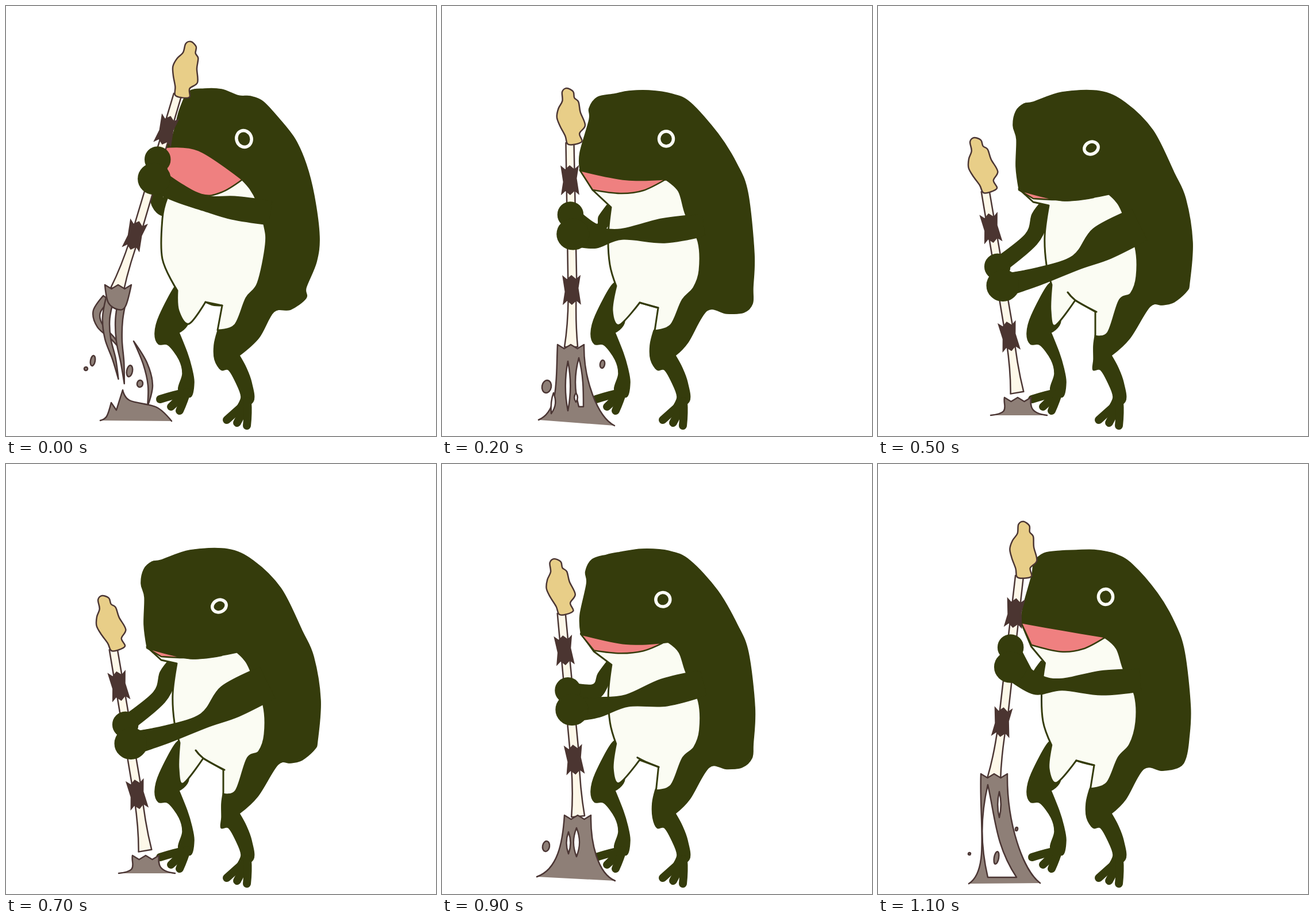
An HTML page that plays this animation: 748 px wide and 748 px high, repeating every 1.2 s.

```html
<!DOCTYPE html>
<html lang="en">
<head>
<meta charset="utf-8">
<title>Frog stirring mud</title>
<style>
html, body { margin: 0; width: 100%; height: 100%; overflow: hidden; background: #fff; }
svg { display: block; width: 100vw; height: 100vh; }
.pose { visibility: hidden; }
.pose.on { visibility: visible; }
path, ellipse { stroke-linejoin: round; stroke-linecap: round; }
.skin { fill: #353c0c; stroke: #353c0c; stroke-width: 1.5; }
.toe { fill: none; stroke: #353c0c; stroke-width: 14; }
.belly { fill: #fbfcf3; stroke: #353c0c; stroke-width: 3; }
.fold { fill: none; stroke: #353c0c; stroke-width: 3; }
.mouth { fill: #ef8080; stroke: #353c0c; stroke-width: 2.6; }
.eye { fill: #353c0c; stroke: #fbfcf6; stroke-width: 5.5; }
.stem { fill: #fdf8e9; }
.tip { fill: #e8ce88; }
.mud { fill: #8e7f77; }
.hole { fill: #fff; }
.stem, .tip, .mud, .hole { stroke: #4b3634; stroke-width: 2.5; }
.clump { fill: #4b3531; }
</style>
</head>
<body>
<svg id="stage" viewBox="0 0 748 748"></svg>
<script>
// Outlines are "x,y" points joined by smooth curves; "!" marks a sharp corner.
// Arms are "x,y,radius" joints. The three key poses match point by point.
const shin = ' 406,608! 418,630 427,655 430,688 401,702 409,680 400,655 387,633 374,633';
const farLeg = '296,485 267,538 259,569 265,588 282,590 301,615 307,640 300,668 321,680 327,655 323,630 315,603 301,568! 318,548 310,490';

const raised = {
  body: '363,615 362,590 368,565! 380,500 310,340! 276,247! 290,225 302,180 318,149 345,144 375,145 405,156 425,157 447,166 475,196 503,232 522,275 536,330 545,400 540,445 522,490 522,508 495,528 466,532 440,577' + shin,
  belly: '411,302! 425,318 436,338 449,380 452,415 438,482 418,508 398,555 368,564! 376,521! 347,515! 318,553 300,530 298,495! 272,440 272,370 280,335! 280,310! 276,247! 340,270',
  fold: '347,515 360,520 376,521',
  mouth: '276,246! 335,251 411,302! 375,324 340,328 281,299!',
  eye: '414,231,13,14.5,-20',
  arm: '460,360,21 395,351,20 345,343,13 300,325,16',
  farArm: '282,335,8 272,355,10 262,340,10'
};
const upright = {
  body: '363,615 362,590 368,565! 380,500 310,340! 240,285! 240,255 256,198 256,178 270,159 300,153 325,148 360,147 400,153 432,168 480,222 513,275 532,325 543,430 541,490 540,518 525,533 495,535 461,530 428,585' + shin,
  belly: '390,302! 412,322 424,362 446,410 448,460 438,490 418,512 398,555 370,565! 376,525! 344,516! 308,555 296,530 303,487! 292,450 289,400 294,350! 262,320! 240,285! 320,303',
  fold: '344,516 358,520 376,525',
  mouth: '240,286! 320,302 390,301! 350,321 310,326 262,320!',
  eye: '390,231,12.5,13,0',
  arm: '455,381,19 385,391,21 312,397,9 268,403,18',
  farArm: '294,350,8 282,372,11 266,392,13'
};
const bowed = {
  body: '375,615 375,590 378,570! 385,500 310,340! 245,318! 240,280 241,232 235,208 240,183 254,170 270,167 320,150 385,148 430,168 478,216 515,290 535,335 547,410 542,480 537,496 515,515 495,520 473,523 438,578' + shin,
  belly: '402,327! 415,340 425,358 448,420 450,470 440,500 420,512 400,568 378,574! 378,532! 343,512! 308,556 300,530 302,485! 293,450 290,400 297,347! 270,341! 245,318! 320,338',
  fold: '330,498 345,513 380,532',
  mouth: '245,320! 320,338 375,333! 350,335 310,337 270,335!',
  eye: '371,247,12.5,10.5,-25',
  arm: '455,380,30 390,413,30 345,446,13 280,470,15',
  farArm: '296,342,10 282,368,15 266,406,13'
};

// Moves every point of pose a towards (or past) pose b.
function blend(a, b, t) {
  const pose = {};
  for (const key in a) {
    const goal = b[key].match(/-?[\d.]+/g);
    let i = 0;
    pose[key] = a[key].replace(/-?[\d.]+/g, n => +(+n + (goal[i++] - n) * t).toFixed(1));
  }
  return pose;
}

// tip and foot: ends of the staff; grip: how far down it the hands hold.
// mud: left and right ends of the heap; holes: x, y, height, bulge, flare; drops: x, y, rx, ry.
const steps = [
  { frog: raised, tip: [322, 62], foot: [195, 486], grip: 213, flying: true,
    drops: [[151, 617, 4, 9], [139, 631, 3, 3], [215, 635, 5, 10], [233, 657, 5, 6]] },
  { frog: blend(raised, upright, 0.75), tip: [253, 100], foot: [202, 540], grip: 220, mud: [158, 730, 282, 729],
    holes: [[191, 558, 161, 13, 50], [211, 570, 45, 4, 0]], drops: [[206, 685, 4, 11], [241, 635, 2, 3], [159, 678, 2, 2]] },
  { frog: upright, tip: [217, 143], foot: [224, 590], grip: 220, mud: [168, 720, 300, 730],
    holes: [[219, 618, 86, 6, 0], [238, 612, 85, 8, 8], [194, 673, 36, 5, -4], [233, 673, 16, 4, 0]],
    drops: [[182, 662, 8, 11], [279, 623, 4, 7]] },
  { frog: blend(upright, bowed, 0.3), tip: [195, 165], foot: [236, 612], grip: 230, mud: [165, 718, 301, 725],
    holes: [[234, 633, 50, 7, 0], [220, 640, 38, 5, 0]], drops: [[181, 665, 6, 9]] },
  { frog: blend(upright, bowed, 0.6), tip: [174, 187], foot: [248, 635], grip: 240, mud: [162, 715, 302, 720],
    holes: [[244, 648, 34, 7, -2], [229, 648, 13, 4, -7], [296, 682, 12, 5, 2]], drops: [[184, 670, 4, 6]] },
  { frog: bowed, tip: [167, 229], foot: [243, 682], grip: 228, mud: [196, 712, 294, 712] },
  { frog: blend(upright, bowed, 1.1), tip: [165, 243], foot: [244, 694], grip: 228, mud: [200, 713, 293, 713] }
];

const path = (cls, d) => `<path class="${cls}" d="${d}"/>`;
const oval = (cls, x, y, rx, ry, turn = 0) =>
  `<ellipse class="${cls}" rx="${rx}" ry="${ry}" transform="translate(${x} ${y}) rotate(${turn})"/>`;
const numbers = text => text.split(' ').map(p => p.split(',').map(Number));

function curve(cls, text, open) {
  const pts = text.split(' ').map(p => ({
    xy: p.replace('!', '').split(',').map(Number),
    sharp: p.endsWith('!')
  }));
  const n = pts.length;
  const handle = (i, side) => {
    const p = pts[i];
    if (p.sharp || (open && (i === 0 || i === n - 1))) return p.xy;
    const before = pts[(i + n - 1) % n].xy, after = pts[(i + 1) % n].xy;
    return p.xy.map((v, k) => (v + side * (after[k] - before[k]) / 6).toFixed(1));
  };
  let d = 'M' + pts[0].xy;
  for (let i = 0; i < (open ? n - 1 : n); i++) {
    const j = (i + 1) % n;
    d += 'C' + [handle(i, 1), handle(j, -1), pts[j].xy].join(' ');
  }
  return path(cls, open ? d : d + 'Z');
}

// Outlines a chain of joints, each with its own radius.
function limb(cls, joints) {
  const side = s => joints.map(([x, y, r], i) => {
    const a = joints[Math.max(i - 1, 0)], b = joints[Math.min(i + 1, joints.length - 1)];
    const dx = b[0] - a[0], dy = b[1] - a[1], k = s * r / Math.hypot(dx, dy);
    const end = i === 0 || i === joints.length - 1 ? '!' : '';
    return `${(x - dy * k).toFixed(1)},${(y + dx * k).toFixed(1)}${end}`;
  });
  return curve(cls, [...side(1), ...side(-1).reverse()].join(' '));
}

const toes = (x, y, tips) => tips.map(([tx, ty]) =>
  path('toe', `M${x} ${y}Q${(x + tx) / 2 + 2} ${(y + ty) / 2 - 2} ${tx} ${ty}`)).join('');

// Ragged rag: zigzag at both ends, narrow waist.
function clump(y) {
  const teeth = s => [-2, -1, 0, 1, 2].map(k => `${3 + s * k * 8},${y - s * (k % 2 ? 19 : 26)}`);
  return path('clump', 'M' + [...teeth(1), `15,${y - 3}`, ...teeth(-1), `-9,${y + 3}`].join('L') + 'Z');
}

function staff() {
  return path('stem', 'M-3 95V360Q-4 410 -11 450H12Q8 400 12 340L11 95Z')
    + curve('tip', '0,0 11,6 13,17 20,24 23,42 31,65 21,79 25,93 12,98 0,97 -4,83 -13,65 -18,50 -15,35 -8,22 -8,6')
    + clump(160) + clump(351);
}

const crown = ([x, y]) => [-2, -1, 0, 1, 2].map(k => `${x + k * 11.5},${y + (k % 2 ? 6 : -1)}`);

function heap(foot, [lx, ly, rx, ry]) {
  const [x, y] = foot, h = ly - y;
  return path('mud', `M${lx} ${ly}C${lx + 36} ${ly - h * 0.12} ${x - 26} ${y + h * 0.45} `
    + crown(foot).join('L') + `C${x + 22} ${y + h * 0.45} ${rx - 30} ${ry - h * 0.12} ${rx} ${ry}`);
}

function hole([x, y, h, w, flare]) {
  const a = y + h * 0.35, b = y + h * 0.65, end = y + h;
  return path('hole', `M${x} ${y}C${x + w} ${a} ${x + w} ${b} ${x + flare} ${end}`
    + `L${Math.min(x, x + flare)} ${end}C${x - w} ${b} ${x - w} ${a} ${x} ${y}Z`);
}

// Mud torn off the ground: strands hanging from the staff, a spout and a low pile.
function tornMud(foot) {
  const [x, y] = foot;
  const strand = (dx, reach, sway) => limb('mud', [0, 0.25, 0.5, 0.75, 1].map(t => [
    x + dx * (1 - t * 0.4) - sway * Math.sin(t * 4.6), y + 22 + (reach - 22) * t, 7 * (1 - t) + 1.5 * Math.sin(t * 3.14)
  ]));
  return strand(-20, 118, 21) + strand(-14, 163, 9) + strand(8, 171, 6)
    + curve('mud', [...crown(foot).map(p => p + '!'), `${x + 13},${y + 36}`, `${x},${y + 42}`, `${x - 17},${y + 30}`].join(' '))
    + limb('mud', numbers('222,583,0 242,622,3.5 251,660,4 246,697,0'))
    + curve('mud', '164,721! 175,714 183,690! 192,703! 203,668! 215,686 262,698 288,722!', true);
}

function draw({ frog, tip, foot, grip, mud, flying, holes = [], drops = [] }) {
  const dx = foot[0] - tip[0], dy = foot[1] - tip[1], length = Math.hypot(dx, dy);
  const turn = Math.atan2(dy, dx) * 180 / Math.PI - 90;
  const along = (d, side) => [tip[0] + (dx * d + dy * side) / length, tip[1] + (dy * d - dx * side) / length];
  const farHand = along(grip, 3), nearHand = along(grip + 34, 7);
  return '<g class="pose">' + [
    curve('skin', farLeg),
    toes(314, 672, [[268, 684], [287, 697], [302, 704]]),
    limb('skin', [...numbers(frog.farArm), [...farHand, 14]]),
    curve('skin', frog.body),
    toes(420, 688, [[384, 720], [402, 725], [419, 730]]),
    curve('belly', frog.belly),
    curve('fold', frog.fold, true),
    curve('mouth', frog.mouth),
    oval('eye', ...frog.eye.split(',')),
    `<g transform="translate(${tip}) rotate(${turn})">${staff()}</g>`,
    oval('skin', ...farHand, 22, 22),
    limb('skin', [...numbers(frog.arm), [...nearHand, 20]]),
    oval('skin', ...nearHand, 28, 27),
    flying ? tornMud(foot) : heap(foot, mud),
    ...holes.map(hole),
    ...drops.map(d => oval('mud', ...d, 10))
  ].join('') + '</g>';
}

const stage = document.getElementById('stage');
stage.innerHTML = steps.map(draw).join('');
const groups = [...stage.children];

// The steps run down and back up again, 100 ms each.
function tick() {
  const beat = Math.floor(performance.now() / 100) % 12;
  const current = Math.min(beat, 12 - beat);
  groups.forEach((g, i) => g.classList.toggle('on', i === current));
  requestAnimationFrame(tick);
}
tick();
</script>
</body>
</html>
```
